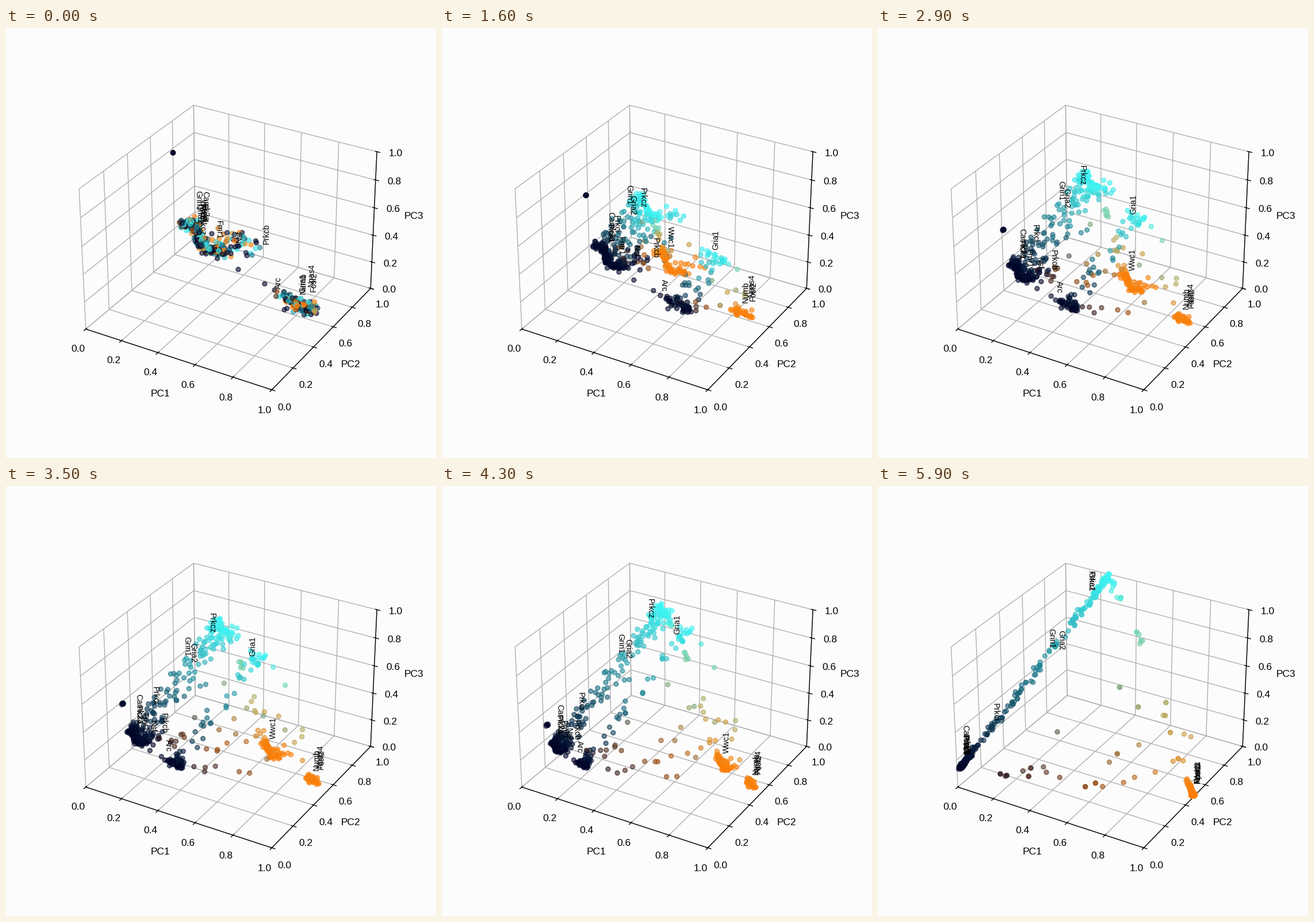
A matplotlib script that plays this animation: 748x748 px, repeating every 6 s.

```python
import matplotlib.pyplot as plt
import numpy as np
from matplotlib.animation import FuncAnimation

SIZE, DPI = 748, 125
FRAMES, INTERVAL = 60, 100
VERTICAL_X = 391          # the PC3 direction is exactly upright here
LEAN = 0.000168           # sideways lean of PC3 per pixel off that line
LABEL_LIFT = 24

rng = np.random.default_rng(12)

plt.rcParams["font.family"] = "Liberation Sans"

# Corners of the final triangle (pixels) and their colours
NAVY, CYAN, ORANGE = (144, 489), (401, 158), (549, 538)
CORNERS = np.array([NAVY, CYAN, ORANGE], float)
COLOURS = np.array([(1, 5, 40), (62, 246, 246), (255, 126, 6)]) / 255

# Centre lines of the two starting clouds
MAIN = [(302, 341), (329, 341), (337, 370), (347, 384), (388, 391)]
SIDE = [(469, 463), (503, 479), (516, 486), (540, 487)]

# Label starts, grouped by the place they move to
LABELS = {
    NAVY: {"Arc": (467, 475), "Prkcb": (446, 397), "Nsf": (399, 394),
           "Fmr1": (363, 389), "Camk2a": (339, 357), "Pick1": (337, 362)},
    ORANGE: {"Wwc1": (335, 357), "Numb": (510, 484), "Npas4": (524, 471),
             "Fosl2": (528, 480)},
    (363, 204): {"Prkcz": (334, 382), "Gria1": (509, 482)},
    (311, 306): {"Gria2": (329, 361)},
    (294, 303): {"Grin1": (327, 338)},
    (197, 430): {"Prkci": (333, 359)},
}


def jitter(points, spread):
    return points + rng.normal(0, spread, np.shape(points))


def along(path, u):
    """Points at the fractions u of the length of a polyline."""
    path = np.array(path, float)
    steps = np.hypot(*np.diff(path, axis=0).T)
    dist = np.append(0, np.cumsum(steps)) / steps.sum()
    return np.c_[np.interp(u, dist, path[:, 0]), np.interp(u, dist, path[:, 1])]


def rim(low, high, n, spread):
    """Points on the bowed cyan to orange side."""
    u = rng.uniform(low, high, n)
    bow = np.c_[14 * np.sin(np.pi * u), np.zeros(n)]
    return jitter(along([CYAN, ORANGE], u) + bow, spread)


def make_ends():
    spine = [NAVY, CYAN]
    return np.vstack([
        jitter(along(spine, rng.exponential(0.025, 140)), 1.6),
        jitter(along(spine, rng.uniform(0.06, 0.95, 85)), 3),
        jitter(along(spine, 1 - rng.exponential(0.06, 60)), 2.8),
        jitter(along([(508, 450), ORANGE], 1 - rng.exponential(0.1, 75)), 1.5),
        rim(0.02, 0.1, 9, 6),
        rim(0.22, 0.34, 6, 3),
        rim(0.6, 0.9, 9, 9),
        jitter(along([NAVY, ORANGE], rng.uniform(0.12, 0.85, 14)), 9),
        rng.dirichlet((2, 2, 3), 7) @ CORNERS,
    ])


def main_starts(n):
    starts = jitter(along(MAIN, rng.beta(1.4, 1.6, n)), 4)
    tail = rng.random(n) < 0.14
    starts[tail] = (400, 376) + rng.normal(0, 1, (tail.sum(), 2)) * (24, 12)
    return starts


def side_starts(n):
    return jitter(along(SIDE, rng.beta(1.8, 1.3, n)), 6)


def corner_weights(points):
    matrix = np.vstack([CORNERS.T, np.ones(3)])
    weights = np.linalg.solve(matrix, np.c_[points, np.ones(len(points))].T).T
    weights = np.clip(weights, 0, None)
    return weights / weights.sum(axis=1, keepdims=True)


def depth_ratio(starts, ends):
    """Points going from the back of the box to the orange corner come nearer."""
    from_back = starts[:, 0] < 455
    return (1 - 0.07 * from_back * corner_weights(ends)[:, 2])[:, None]


def build_points():
    main = make_ends()
    side = rng.choice(main, 130, replace=False)
    outlier = np.tile((290.5, 217), (5, 1))
    strays = [(404, 420), (450, 445)]
    starts = np.vstack([main_starts(len(main)), side_starts(len(side)),
                        outlier, strays])
    ends = np.vstack([main, side, jitter(np.tile(NAVY, (7, 1)), 2)])
    order = rng.permutation(len(ends))
    return starts[order], ends[order]


def blend(starts, ends, ratio, t):
    """Straight motion in space, seen in perspective."""
    return (starts * (1 - t) + ends * ratio * t) / (1 - t + ratio * t)


def text_angle(x):
    angle = 90 - np.degrees(np.arctan(LEAN * (x - VERTICAL_X)))
    return angle if angle <= 90 else angle - 180


fig = plt.figure(figsize=(SIZE / DPI, SIZE / DPI), dpi=DPI, facecolor="#fcfcfc")

box = fig.add_subplot(projection="3d", facecolor="none")
box.set(xlim=(0, 1), ylim=(0, 1), zlim=(0, 1),
        xlabel="PC1", ylabel="PC2", zlabel="PC3")
for axis in (box.xaxis, box.yaxis, box.zaxis):
    axis.pane.set_visible(False)

stage = fig.add_axes([0, 0, 1, 1], facecolor="none")
stage.set(xlim=(0, SIZE), ylim=(SIZE, 0))
stage.axis("off")

starts, ends = build_points()
ratios = depth_ratio(starts, ends)
colours = np.c_[corner_weights(ends) @ COLOURS, np.full(len(ends), 0.6)]
dots = stage.scatter(*starts.T, s=20, c=colours, linewidths=1)

names, label_starts, label_ends = zip(*[
    (name, start, end)
    for end, group in LABELS.items() for name, start in group.items()])
label_starts, label_ends = np.array(label_starts), np.array(label_ends)
label_ratios = depth_ratio(label_starts, label_ends)
texts = [stage.text(0, 0, name, fontsize=8, zorder=3) for name in names]


def update(frame):
    t = frame / (FRAMES - 1)
    dots.set_offsets(blend(starts, ends, ratios, t))
    places = blend(label_starts, label_ends, label_ratios, t)
    for text, (x, y) in zip(texts, places):
        text.set_position((x, y - LABEL_LIFT))
        text.set_rotation(text_angle(x))
    return [dots, *texts]


anim = FuncAnimation(fig, update, frames=FRAMES, interval=INTERVAL,
                     init_func=lambda: update(0), repeat=True, repeat_delay=0)
plt.show()
```
